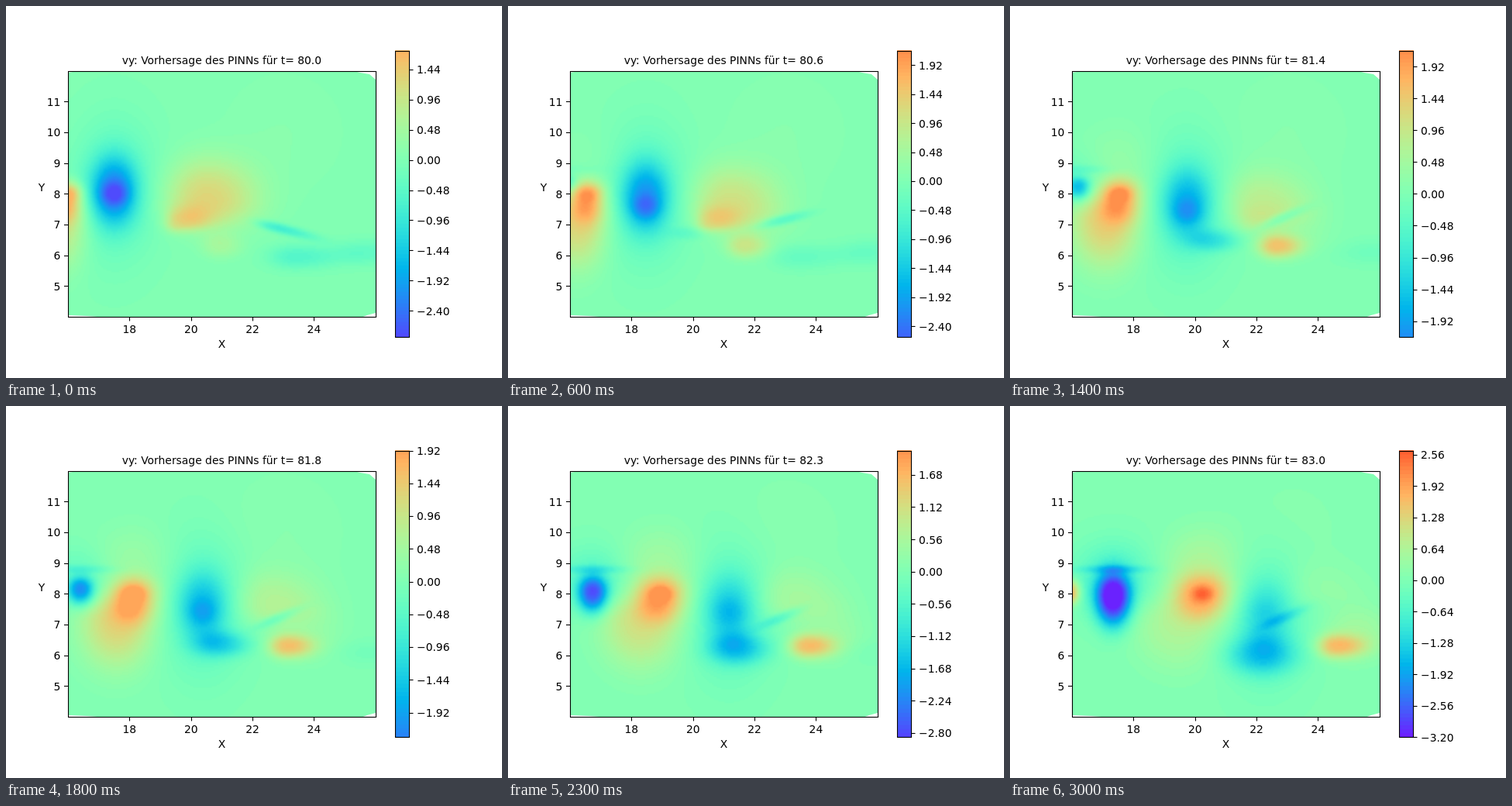
Recreate the animation shown at these times as an HTML page with a canvas. Size 640 px wide and 480 px high, loop 3.1 s.

```html
<!DOCTYPE html>
<html lang="de">
<head>
<meta charset="utf-8">
<title>vy: Vorhersage des PINNs</title>
<style>
  html, body { margin: 0; width: 100%; height: 100%; overflow: hidden; background: #fff; }
  canvas, svg { position: absolute; left: 0; top: 0; width: 640px; height: 480px; }
  text { font: 13.89px "DejaVu Sans", sans-serif; fill: #000; }
  path, rect { fill: none; stroke: #000; stroke-width: 1.1; }
  .gap { fill: #fff; stroke: none; }
  .mid { text-anchor: middle; }
  .end { text-anchor: end; }
</style>
</head>
<body>
<canvas id="stage" width="640" height="480"></canvas>
<svg viewBox="0 0 640 480">
  <path class="gap" d="M449 84L457 86L469 88L477 95V84ZM80 402V399L104 400L132 402ZM458 402L466 399L477 396V402ZM80 84H92L80 86Z"/>
  <rect x="80.5" y="84.5" width="397" height="317"/>
  <rect x="502.5" y="58.5" width="18" height="369"/>
  <text id="title" class="mid" x="278.4" y="75"></text>
  <text class="mid" x="278.4" y="441">X</text>
  <text class="mid" x="46" y="239">Y</text>
  <g id="axes"></g>
  <g id="scale"></g>
</svg>
<script>
const FRAMES = 31, STEP_MS = 100, LIMIT = 3.45;
const BOX = { x: 80, y: 83.66, w: 396.8, h: 317.44 };
const BAR = { x: 502, y: 57.6, w: 18.5, h: 369.6 };
const W = 199, H = 159;
const $ = id => document.getElementById(id);
const ctx = $('stage').getContext('2d');
const grid = document.createElement('canvas');
grid.width = W;
grid.height = H;
const gridCtx = grid.getContext('2d');
const image = gridCtx.createImageData(W, H);
const values = new Float32Array(W * H);

// Adds a flattened bell; a width may be a pair for its two sides.
function lobe(amp, x, y, width, height, tilt = 0) {
  const [left, right] = [width].flat().concat(width);
  const [up, down] = [height].flat().concat(height);
  const c = Math.cos(tilt), s = Math.sin(tilt);
  for (let j = 0, n = 0; j < H; j++) {
    const dy = 12 - 8 * (j + .5) / H - y;
    for (let i = 0; i < W; i++, n++) {
      const dx = 16 + 10 * (i + .5) / W - x;
      const a = c * dx + s * dy, b = c * dy - s * dx;
      const u = a / (a < 0 ? left : right), v = b / (b < 0 ? down : up);
      const q = u * u + v * v;
      if (q < 6) values[n] += amp * Math.exp(-(q ** 1.2));
    }
  }
}

function firstTrough(t) {
  const x = 17.5 + 1.6 * t, y = 8.1 - .3 * t;
  lobe(-.55, x, y, 1.4, 2.3);
  lobe(.35 * t - 1.75, x, y, .78, 1.15);
  lobe(.18 * t - .65, x, 7.4 + .6 * Math.exp(-2 * t), .45, .4);
  // low arm left behind underneath
  lobe(-1.1 * Math.min(1, t / 2), 19.3 + .95 * t, 6.9 - .3 * t, .5 + .22 * t, .1 + .18 * t);
}

function firstCrest(t) {
  const x = 16 + .85 * t + .19 * t * t;
  lobe(1.4, x, 8, .5 + .15 * t, [.45 + .08 * t, .85]);
  lobe(1 + .5 * Math.sin(Math.PI * t / 3) - .12 * t, x - .2 - .2 * t, 7.1, .85 + .2 * t, [.85, 1.5]);
  lobe(.2 * t, x, 8.8, 1.3, 1.3);
  lobe(.35 + .1 * t, x, 8, .35, .25);
}

function secondTrough(t) {
  const x = 15.9 + .16 * t * t, grow = t * t;
  lobe(-.22 * t, x, 8.5, .6 + .25 * t, .5 + .25 * t);
  lobe(-1.05 * t, x, 8.5 - .2 * t, .2 + .13 * t, [.2 + .07 * grow, .25 + .08 * grow]);
  lobe(-.2 * t, x, 8.8, 1.2, .14);
}

function secondCrest(t) {
  lobe(1.25 - .33 * t, 20.5 + 1.1 * t, 7.8 - .35 * t + .15 * t * t,
    [1.35 - .2 * t, 1.7], [1.35 - .15 * t, .95 - .15 * t]);
  lobe(Math.max(0, .85 - .3 * t * t), 19.6 + 1.6 * t, 7.05, [.45, 1], [.5, .3], .08);
}

function wake(t) {
  const x = 20.95 + 1.2 * t, turn = Math.min(1, t / .8);
  lobe(Math.min(1.4, .45 + .7 * t), x, 6.3, [.6, .7 + .1 * t], .4);
  lobe(.15 * t, x + .7, 6.75, 1.1, .9);
  lobe(.1 * t - .85, 22.8, 6.9 + .3 * turn, [.7, 1.3 - .4 * turn], .17, .65 * turn - .25);
  lobe(Math.min(0, .4 * t - .6), 23.4, 5.95, [.9, 1.5], .4);
  lobe(.13 * t - .4, 25.7, 6.1, 1, .4);
}

function background(t) {
  values.fill(.02);
  lobe(.1, 23, 10, 2, 2);
  lobe(1.8 * Math.max(0, 2 * t - 5), 15.95, 8.05, .3, .4);
}

// Linear interpolation through evenly spaced knots over the whole run.
function at(knots, p) {
  const s = p * (knots.length - 1);
  const i = Math.min(Math.floor(s), knots.length - 2);
  return knots[i] + (knots[i + 1] - knots[i]) * (s - i);
}

function levels(p) {
  const top = at([1.72, 2.08, 2.26, 2.09, 1.8, 2.2, 2.6], p);
  const low = at([-2.8, -2.58, -2.38, -2.1, -2.39, -3.14, -3.18], p);
  const step = Math.ceil((top - low) / .8) / 100;
  return { step, first: Math.floor(low / step), last: Math.ceil(top / step) };
}

function rainbow(v) {
  const x = Math.max(0, Math.min(1, .5 + v / (2 * LIMIT)));
  return [Math.abs(2 * x - .5), Math.sin(Math.PI * x), Math.cos(Math.PI * x / 2)]
    .map(c => Math.round(255 * Math.min(1, c)));
}

function drawField(t, { step, first, last }, colors) {
  [background, firstTrough, firstCrest, secondTrough, secondCrest, wake].forEach(part => part(t));
  values.forEach((v, n) => {
    const k = Math.max(first, Math.min(last - 1, Math.floor(v / step)));
    image.data.set([...colors[k - first], 255], 4 * n);
  });
  gridCtx.putImageData(image, 0, 0);
  ctx.drawImage(grid, BOX.x, BOX.y, BOX.w, BOX.h);
}

const snap = v => Math.floor(v + .5) + .5;
const baseline = y => Math.round(y + 5.4);

function drawBar({ step, first, last }, colors) {
  const n = last - first, unit = BAR.h / n;
  colors.forEach((c, i) => {
    ctx.fillStyle = `rgb(${c})`;
    ctx.fillRect(BAR.x, BAR.y, BAR.w, BAR.h - i * unit);
  });
  const every = 1 + Math.floor(n / 10);
  let marks = '';
  for (let k = Math.ceil(first / every) * every; k <= last; k += every) {
    const y = BAR.y + (last - k) * unit;
    const label = (k < 0 ? '\u2212' : '') + Math.abs(k * step).toFixed(2);
    marks += `<path d="M520.5 ${snap(y)}h5"/><text x="530" y="${baseline(y)}">${label}</text>`;
  }
  $('scale').innerHTML = marks;
}

function drawAxes() {
  let marks = '';
  for (let v = 18; v <= 24; v += 2) {
    const x = BOX.x + (v - 16) * BOX.w / 10;
    marks += `<path d="M${snap(x)} 401.5v5"/><text class="mid" x="${x}" y="422">${v}</text>`;
  }
  for (let v = 5; v <= 11; v++) {
    const y = BOX.y + (12 - v) * BOX.h / 8;
    marks += `<path d="M80 ${snap(y)}h-5"/><text class="end" x="70.3" y="${baseline(y)}">${v}</text>`;
  }
  $('axes').innerHTML = marks;
}

let shown = -1;
function draw(now) {
  const frame = Math.floor(now / STEP_MS) % FRAMES;
  if (frame === shown) return;
  shown = frame;
  const lv = levels(frame / (FRAMES - 1));
  const colors = Array.from({ length: lv.last - lv.first }, (_, i) => rainbow((lv.first + i + .5) * lv.step));
  ctx.clearRect(0, 0, 640, 480);
  drawField(frame / 10, lv, colors);
  drawBar(lv, colors);
  $('title').textContent = `vy: Vorhersage des PINNs für t= ${(80 + frame / 10).toFixed(1)}`;
}

drawAxes();
const start = performance.now();
function loop() {
  draw(performance.now() - start);
  requestAnimationFrame(loop);
}
loop();
</script>
</body>
</html>
```
